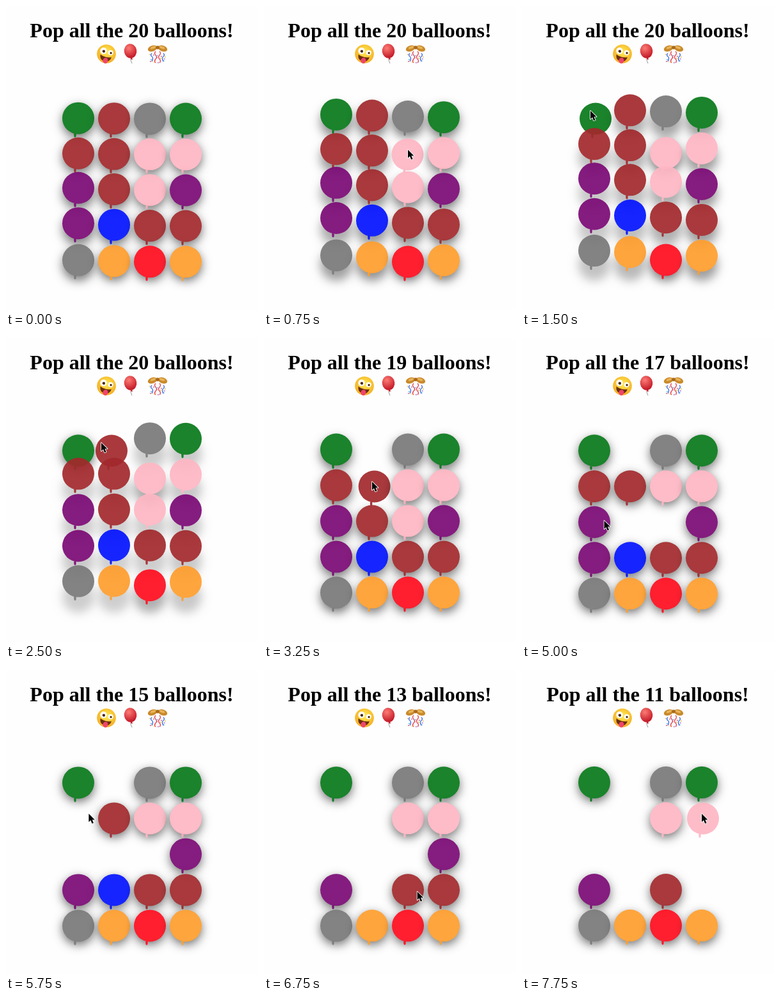
An HTML page with a canvas that plays this animation: 394 px wide and 476 px high, repeating every 8 s.

```html
<!DOCTYPE html>
<html lang="en">
<head>
<meta charset="utf-8">
<title>Pop the balloons</title>
<style>
  html, body { margin: 0; width: 100%; height: 100%; overflow: hidden; background: #fefefe; }
  canvas { display: block; }
</style>
</head>
<body>
<canvas id="stage" width="394" height="476"></canvas>
<script>
const ctx = document.getElementById('stage').getContext('2d');
const WIDTH = 394, HEIGHT = 476, LOOP = 8000, STEP = 250;
const COLUMNS = 4, GAP = 56, RADIUS = 25, OPACITY = 0.92, TAU = Math.PI * 2;

const COLORS = {
  g: '#1b842c', b: '#a93a3d', y: '#848484', p: '#febdc9',
  u: '#861d80', L: '#1726ff', o: '#ffa63e', r: '#ff1f30'
};
const LAYOUT = 'gbygbbppubpuuLbbyoro';

// The pointer rests on one balloon after another; some pop when it is done
const stop = (id, enter, leave, pops = false, dx = 0) => ({ id, enter, leave, pops, dx });
const popRun = [9, 8, 4, 5, 13, 15, 11].map((id, i) => {
  const time = 4765 + 445 * i;
  return stop(id, time - 120, time, true);
});
const STOPS = [
  stop(18, 400, 700),
  stop(6, 720, 770),
  stop(0, 844, 2250, false, -6),
  stop(1, 2254, 2600, true, -20),
  stop(5, 2750, 3550),
  stop(9, 3550, 3750),
  stop(10, 3754, 4320, true, -15),
  ...popRun,
  stop(7, 7586, LOOP)
];

const mix = (a, b, k) => a + (b - a) * k;
const column = id => id % COLUMNS;
const row = id => Math.floor(id / COLUMNS);

function bezier(x1, y1, x2, y2) {
  const at = (a, b, u) => 3 * a * u * (1 - u) ** 2 + 3 * b * u * u * (1 - u) + u ** 3;
  return x => {
    let lo = 0, hi = 1;
    for (let i = 0; i < 20; i++) {
      const mid = (lo + hi) / 2;
      if (at(x1, x2, mid) < x) lo = mid; else hi = mid;
    }
    return at(y1, y2, lo);
  };
}
const easeInOut = bezier(.42, 0, .58, 1);
const easeShake = bezier(.36, .07, .19, .97);

// Left columns have floated for longer when the loop starts
const startAge = id => (3 - column(id)) * (250 + 90 * Math.sin((row(id) - 1.3) * 1.1)) - 40;

function lift(age) {
  const half = (Math.max(0, age) % 6000) / 3000;
  return half < 1 ? easeInOut(half) : 1 - easeInOut(half - 1);
}

// Swings left and right, doubling up to 4 px and dying down again
function shake(age) {
  const swing = i => (-1) ** i * Math.min(4, Math.floor(2 ** (Math.min(i, 10 - i) - 1)));
  const pos = (age % 820) / 82, i = Math.floor(pos);
  return mix(swing(i), swing(i + 1), easeShake(pos - i));
}

function disc(color, x, y, rx, ry = rx, turn = 0) {
  ctx.fillStyle = color;
  ctx.beginPath();
  ctx.ellipse(x, y, rx, ry, turn, 0, TAU);
  ctx.fill();
}

function stroke(color, width, d) {
  ctx.strokeStyle = color;
  ctx.lineWidth = width;
  ctx.stroke(new Path2D(d));
}

function fill(color, d) {
  ctx.fillStyle = color;
  ctx.fill(new Path2D(d));
}

function glow(x, y, radius, inner, outer) {
  const gradient = ctx.createRadialGradient(x, y, 1, x, y, radius);
  gradient.addColorStop(0, inner);
  gradient.addColorStop(1, outer);
  return gradient;
}

function drawShadow(x, y, height) {
  ctx.save();
  ctx.beginPath();
  ctx.rect(0, 0, WIDTH, HEIGHT);
  ctx.arc(x, y, RADIUS - .5, 0, TAU);
  ctx.clip('evenodd');
  // The caster sits off stage so that only its shadow shows
  ctx.shadowColor = `rgba(0,0,0,${mix(.6, .2, height)})`;
  ctx.shadowBlur = 15;
  ctx.shadowOffsetX = 1000;
  ctx.shadowOffsetY = mix(5, 25, height);
  disc('#000', x - 1000, y, RADIUS);
  ctx.restore();
}

// Colour that shows as the given one when blended over white
function undiluted(hex) {
  const parts = [1, 3, 5].map(i => parseInt(hex.slice(i, i + 2), 16));
  return `rgb(${parts.map(v => Math.max(0, Math.round((v - 255 * (1 - OPACITY)) / OPACITY)))})`;
}

function drawBalloon(id, t) {
  const hover = STOPS.find(s => s.id === id && t >= s.enter && t < s.leave);
  let x = 113 + GAP * column(id), y = 176.5 + GAP * row(id);
  ctx.globalAlpha = OPACITY;
  if (hover) {
    x += shake(t - hover.enter);
  } else {
    // Every pop restarts all balloons; leaving one restarts that one
    const restarts = STOPS.filter(s => s.leave <= t && (s.pops || s.id === id)).map(s => s.leave);
    const height = lift(t - Math.max(-startAge(id), ...restarts));
    y -= 20 * height;
    drawShadow(x, y, height);
  }
  const color = undiluted(COLORS[LAYOUT[id]]);
  disc(color, x, y, RADIUS);
  fill(color, `M${x - 6.8} ${y + 24.2}h3.4v4q0 2-1.6 2t-1.6-2z`);
  ctx.globalAlpha = 1;
}

function drawFace() {
  ctx.save();
  ctx.translate(157, 75);
  ctx.rotate(.25);
  disc(glow(0, -3, 18, '#ffe84f', '#f3ab22'), 0, 0, 14.8);
  fill('#6b2f10', 'M-9 3Q0 7 9 3Q8 12 0 12T-9 3Z');
  disc('#f0446c', 1, 10.5, 4, 4.5);
  for (const [x, size] of [[-5.5, 5.2], [6, 4]]) {
    disc('#fff', x, -3.5, size);
    disc('#4b2a17', x + .5, -3, size * .42);
  }
  ctx.restore();
}

function drawRedBalloon() {
  stroke('#8b8b8b', .9, 'M196 81Q194 85 197 90');
  disc(glow(192, 66, 15, '#f9756f', '#c41a28'), 194.5, 70.5, 9.8, 11.3, -.15);
  fill('#c41a28', 'M196 80l2.5 3.5h-4z');
}

function drawConfetti() {
  for (const side of [-1, 1]) {
    disc('#c98a2b', 237 + 8 * side, 66.5, 7.5, 4.5, .35 * side);
    disc('#e8b45a', 237 + 7 * side, 65, 4.5, 1.8, .35 * side);
    stroke('#e4505c', 1.5, `M${237 + 3 * side} 71q${3 * side} 3 0 6t0 6t0 6`);
    stroke('#4a78e0', 1.5, `M${237 + 9 * side} 74q${3 * side} 3 0 5t0 8`);
  }
  disc('#a9681c', 237, 65, 2.8);
  const bits = ['#f2bd3a', '#e4505c', '#57b5e8', '#a06bd0'];
  for (let i = 0; i < 14; i++) {
    ctx.fillStyle = bits[i % bits.length];
    ctx.fillRect(224 + (i * 11) % 27, 75 + (i * 5) % 14, 1.6, 1.6);
  }
}

const aim = s => [113 + GAP * column(s.id) + s.dx, 164 + 61 * row(s.id)];

function drawPointer(t) {
  const last = STOPS.findLastIndex(s => s.enter <= t);
  if (last < 0) return;
  const from = STOPS[last], to = STOPS[last + 1] || from;
  const k = t > from.leave ? (t - from.leave) / (to.enter - from.leave) : 0;
  const [start, end] = [aim(from), aim(to)];
  ctx.save();
  ctx.translate(mix(start[0], end[0], k), mix(start[1], end[1], k));
  ctx.scale(.86, .86);
  ctx.lineJoin = 'round';
  const arrow = 'M0 0V15.2L3.5 12L6 18L8.8 16.8L6.3 11H11Z';
  stroke('#fff', 2, arrow);
  fill('#000', arrow);
  ctx.restore();
}

function draw(t) {
  ctx.fillStyle = '#fefefe';
  ctx.fillRect(0, 0, WIDTH, HEIGHT);
  const popped = STOPS.filter(s => s.pops && s.leave <= t).map(s => s.id);

  ctx.fillStyle = '#000';
  ctx.font = 'bold 32px "Liberation Serif", Times, serif';
  ctx.textAlign = 'center';
  ctx.fillText(`Pop all the ${LAYOUT.length - popped.length} balloons!`, 196.5, 49);
  drawFace();
  drawRedBalloon();
  drawConfetti();

  for (let id = 0; id < LAYOUT.length; id++) {
    if (!popped.includes(id)) drawBalloon(id, t);
  }
  drawPointer(t);
}

function frame() {
  const t = performance.now() % LOOP;
  draw(Math.floor(t / STEP) * STEP);
  requestAnimationFrame(frame);
}
frame();
</script>
</body>
</html>
```
